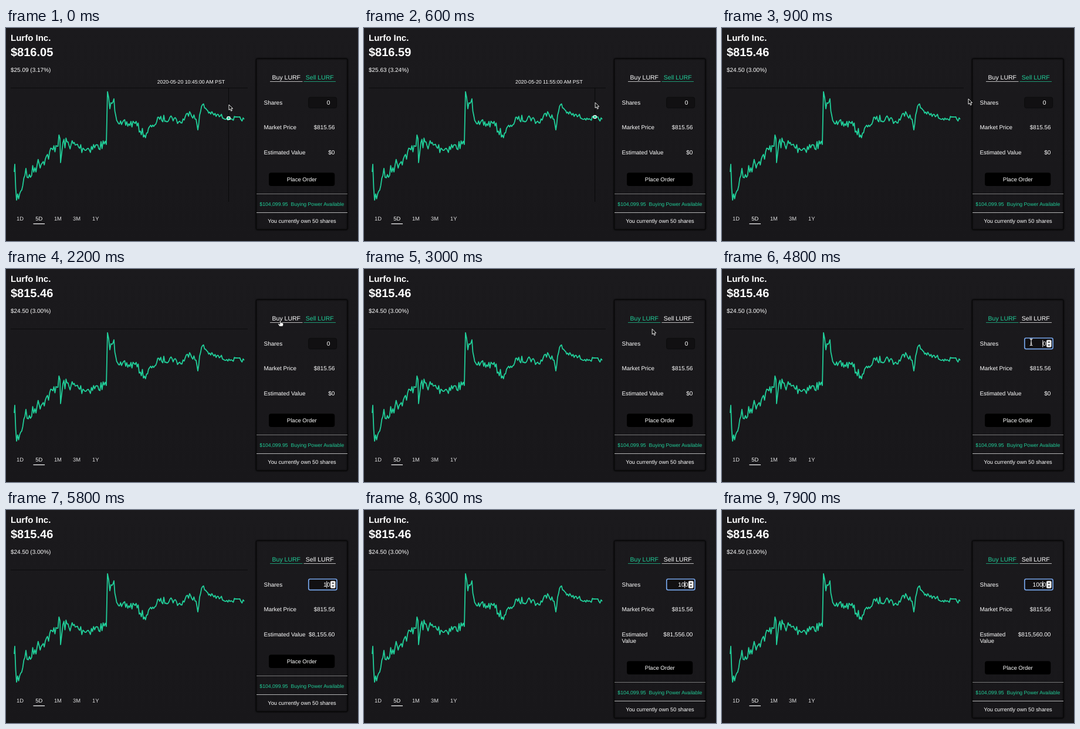
An HTML page with a canvas that plays this animation: 600 px wide and 364 px high, repeating every 8000 ms.

```html
<!DOCTYPE html>
<html lang="en">
<head>
<meta charset="utf-8">
<title>Stock order</title>
<style>
  html, body { margin: 0; width: 100%; height: 100%; overflow: hidden; background: #19181b; }
  canvas { display: block; width: 600px; height: 364px; }
</style>
</head>
<body>
<canvas id="stage"></canvas>
<script>
const W = 600, H = 364, LOOP = 8000, STEP = 100;
const GREEN = '#21ce99', WHITE = '#fff', SOFT = '#dededf';
const canvas = document.getElementById('stage');
const ctx = canvas.getContext('2d');
const dpr = window.devicePixelRatio || 1;
canvas.width = W * dpr;
canvas.height = H * dpr;
ctx.scale(dpr, dpr);
ctx.textRendering = 'geometricPrecision';

const shade = ctx.createLinearGradient(0, 0, 0, H);
shade.addColorStop(0, '#1b1a1d');
shade.addColorStop(1, '#18171a');

// Turning points of the price trend; seeded noise fills the gaps.
const trend = [
  [14, 246], [15, 233], [18, 294], [25, 279], [34, 240], [38, 256], [53, 234], [67, 224], [80, 208],
  [92, 189], [93, 230], [97, 196], [118, 200], [133, 207], [171, 199], [173, 109], [177, 138],
  [184, 121], [187, 149], [197, 165], [220, 163], [236, 183], [250, 166], [262, 156], [283, 153],
  [298, 162], [313, 143], [324, 156], [327, 174], [330, 149], [335, 131], [349, 147], [380, 154], [406, 156]
];
const CHART_END = 406;
const curve = buildCurve();

// Pointer stops: time, x, y of the hot spot.
const pointerPath = [
  [0, 380, 131], [400, 380, 131], [900, 420, 121], [1400, 467, 88], [2700, 468, 88], [3400, 527, 125]
];
const BUY_AT = 2300, FOCUS_AT = 3600;
const entries = [{ at: 5400, shares: 10 }, { at: 6200, shares: 100 }, { at: 6700, shares: 1000 }];

function buildCurve() {
  let seed = 7;
  const random = () => (seed = seed * 16807 % 2147483647) / 2147483647;
  const points = [trend[0]];
  for (let i = 1; i < trend.length; i++) {
    const [x0, y0] = trend[i - 1], [x1, y1] = trend[i];
    const count = Math.max(1, Math.round((x1 - x0) / 1.8));
    for (let n = 1; n <= count; n++) {
      const u = n / count, x = x0 + (x1 - x0) * u;
      const swing = (random() - 0.5) * (24 - 17 * x / CHART_END);
      points.push([x, y0 + (y1 - y0) * u + (n < count ? swing : 0)]);
    }
  }
  return points;
}

// The segment of a sorted list that holds a key, and how far along it lies.
function locate(list, key) {
  let i = 0;
  while (i < list.length - 2 && key >= list[i + 1][0]) i++;
  const a = list[i], b = list[i + 1];
  return { a, b, u: Math.min(1, (key - a[0]) / (b[0] - a[0])) };
}

function pointerAt(t) {
  const { a, b, u } = locate(pointerPath, t);
  const k = u * u * (3 - 2 * u);
  return { x: a[1] + (b[1] - a[1]) * k, y: a[2] + (b[2] - a[2]) * k };
}

function chartY(x) {
  const { a, b, u } = locate(curve, x);
  return a[1] + (b[1] - a[1]) * u;
}

function dollars(value) {
  return '$' + value.toLocaleString('en-US', { minimumFractionDigits: 2, maximumFractionDigits: 2 });
}

function text(str, x, y, size, color = WHITE, align = 'left', weight = '') {
  ctx.font = `${weight} ${size}px "Liberation Sans", Arial, sans-serif`;
  ctx.textAlign = align;
  ctx.fillStyle = color;
  ctx.fillText(str, x, y);
}

function bar(x, y, w, h, color) {
  ctx.fillStyle = color;
  ctx.fillRect(x, y, w, h);
}

function roundBox(x, y, w, h, r, fill, stroke, width = 1) {
  ctx.beginPath();
  ctx.roundRect(x, y, w, h, r);
  if (fill) { ctx.fillStyle = fill; ctx.fill(); }
  if (stroke) { ctx.strokeStyle = stroke; ctx.lineWidth = width; ctx.stroke(); }
}

function spinnerArrow(base, tip) {
  ctx.beginPath();
  ctx.moveTo(555.2, base);
  ctx.lineTo(557.3, tip);
  ctx.lineTo(559.4, base);
  ctx.fillStyle = '#444';
  ctx.fill();
}

function drawHeader(hoverX) {
  let price = 815.46, gain = 24.5, base = price;
  if (hoverX !== null) {
    price = 816.05 + (154 - chartY(hoverX)) * 0.28;
    base = 790.96;
    gain = price - base;
  }
  text('Lurfo Inc.', 8, 22, 15, WHITE, 'left', 'bold');
  text(dollars(price), 8, 48.3, 20, WHITE, 'left', 'bold');
  text(`${dollars(gain)} (${(gain / base * 100).toFixed(2)}%)`, 8, 74.5, 10);
}

function drawChart(hoverX) {
  bar(8, 102, 404, 1, '#0b0b0c');
  if (hoverX !== null) bar(hoverX - 1, 102, 1, 195, '#09090a');

  ctx.beginPath();
  curve.forEach(([x, y]) => ctx.lineTo(x, y));
  ctx.strokeStyle = GREEN;
  ctx.lineWidth = 1.8;
  ctx.lineJoin = 'round';
  ctx.stroke();

  if (hoverX !== null) {
    ctx.beginPath();
    ctx.arc(hoverX - 0.5, chartY(hoverX), 2.7, 0, Math.PI * 2);
    ctx.fillStyle = GREEN;
    ctx.fill();
    ctx.strokeStyle = WHITE;
    ctx.lineWidth = 1.2;
    ctx.stroke();
    const minutes = 645 + Math.round(hoverX - 380) * 5;
    const clock = [Math.floor(minutes / 60), minutes % 60, 0].map(n => String(n).padStart(2, '0')).join(':');
    text(`2020-05-20 ${clock} ${minutes < 720 ? 'AM' : 'PM'} PST`, 315.4, 94.6, 8.73, WHITE, 'center');
  }
}

function drawRanges() {
  ['1D', '5D', '1M', '3M', '1Y'].forEach((label, i) =>
    text(label, 24 + i * 32.2, 329.3, 9.4, label === '5D' ? WHITE : SOFT, 'center'));
  bar(46.5, 334, 19.5, 1.2, WHITE);
}

function drawTab(label, x, w, color) {
  text(label, x + w / 2, 87.8, 10.5, color, 'center');
  ctx.globalAlpha = 0.7;
  bar(x, 91, w, 1, color);
  ctx.globalAlpha = 1;
}

function drawInput(t, shares, lastEvent, hovered) {
  const focused = t >= FOCUS_AT;
  roundBox(515.7, 118.3, 48, 18.4, 3, '#111012', '#0c0c0d');
  if (focused) roundBox(515.8, 118, 48.2, 18.6, 2.5, null, '#78a7ec', 1.7);
  text(shares, 552.4, 130.8, 10.3, WHITE, 'right');
  if (focused || hovered) {
    roundBox(553, 121.3, 8.6, 12.4, 2, '#efefef');
    spinnerArrow(126, 123.2);
    spinnerArrow(129, 131.8);
  }
  const caretOn = Math.floor((t - lastEvent) / 500) % 2 === 0;
  if (focused && caretOn) bar(546.3, 121.5, 0.9, 12, WHITE);
}

function drawPanel(t, pointer) {
  const entry = entries.filter(e => t >= e.at).pop() || { at: FOCUS_AT, shares: 0 };
  const value = entry.shares ? dollars(entry.shares * 815.56) : '$0';
  const wrapped = entry.shares >= 100;
  const drop = wrapped ? 11 : 0;

  ctx.save();
  ctx.shadowColor = '#000';
  ctx.shadowBlur = 3 * dpr;
  roundBox(426.5, 52.5, 155.5, 292 + drop, 2, shade, '#060606');
  ctx.restore();

  const buying = t >= BUY_AT;
  drawTab('Buy LURF', 450, 55.5, buying ? GREEN : WHITE);
  drawTab('Sell LURF', 507.5, 54.5, buying ? WHITE : GREEN);

  text('Shares', 439.5, 130.6, 10);
  drawInput(t, entry.shares, entry.at, pointer.x > 516 && pointer.y > 117);

  text('Market Price', 439.5, 173.2, 9.9);
  text('$815.56', 560.4, 173.2, 9.9, WHITE, 'right');
  const labels = wrapped ? ['Estimated', 'Value'] : ['Estimated Value'];
  labels.forEach((label, i) => text(label, 439.5, 216.2 + i * 11.2, 9.85));
  text(value, 560.4, 216.2, 10, WHITE, 'right');

  ctx.save();
  ctx.translate(0, drop);
  roundBox(448, 247.3, 112.3, 22.7, 4, '#000');
  text('Place Order', 504.3, 262.2, 9.55, WHITE, 'center');
  bar(427, 283, 155, 1, '#777778');
  text('$104,099.95', 432.3, 303.8, 8.7, GREEN);
  text('Buying Power Available', 485.6, 303.8, 8.7, GREEN);
  bar(427, 315, 155, 1, '#b4b4b5');
  text('You currently own 50 shares', 504.5, 333, 9.25, WHITE, 'center');
  ctx.restore();
}

const arrowShape = new Path2D('M0 0V9.2L2.1 7.3L3.7 10.8L5.3 10.1L3.8 6.7H6.6Z');
const handShape = new Path2D('M-.9 .6Q0-.5.9.6V4L2.3 3.7L3.5 4.2L5 4.8V7.3L4 10H-1.6L-4 6.2Q-4.2 5-3 5.2L-.9 6.6Z');
const beamShape = new Path2D('M-2.3-5.5Q0-5.5 0-4V4Q0 5.5-2.3 5.5M2.3-5.5Q0-5.5 0-4V4Q0 5.5 2.3 5.5M-1.3 1.8H1.3');

function drawPointer({ x, y }) {
  const overTab = x > 450 && x < 562 && y > 77 && y < 92;
  const overInput = x > 516 && y > 117;
  ctx.save();
  ctx.translate(x, y);
  ctx.lineJoin = 'round';
  if (overInput) {
    ctx.strokeStyle = '#e4e4e4';
    ctx.lineWidth = 1.3;
    ctx.stroke(beamShape);
  } else {
    const shape = overTab ? handShape : arrowShape;
    ctx.fillStyle = overTab ? WHITE : '#000';
    ctx.strokeStyle = overTab ? '#111' : '#f2f2f2';
    ctx.lineWidth = overTab ? 0.7 : 1;
    ctx.fill(shape);
    ctx.stroke(shape);
  }
  ctx.restore();
}

function draw(t) {
  const pointer = pointerAt(t);
  const hoverX = pointer.x <= CHART_END ? pointer.x : null;
  bar(0, 0, W, H, shade);
  drawHeader(hoverX);
  drawChart(hoverX);
  drawRanges();
  drawPanel(t, pointer);
  if (t < entries[0].at) drawPointer(pointer);
}

const start = performance.now();
function tick() {
  const t = (performance.now() - start) % LOOP;
  draw(Math.floor(t / STEP) * STEP);
  requestAnimationFrame(tick);
}
tick();
</script>
</body>
</html>
```
